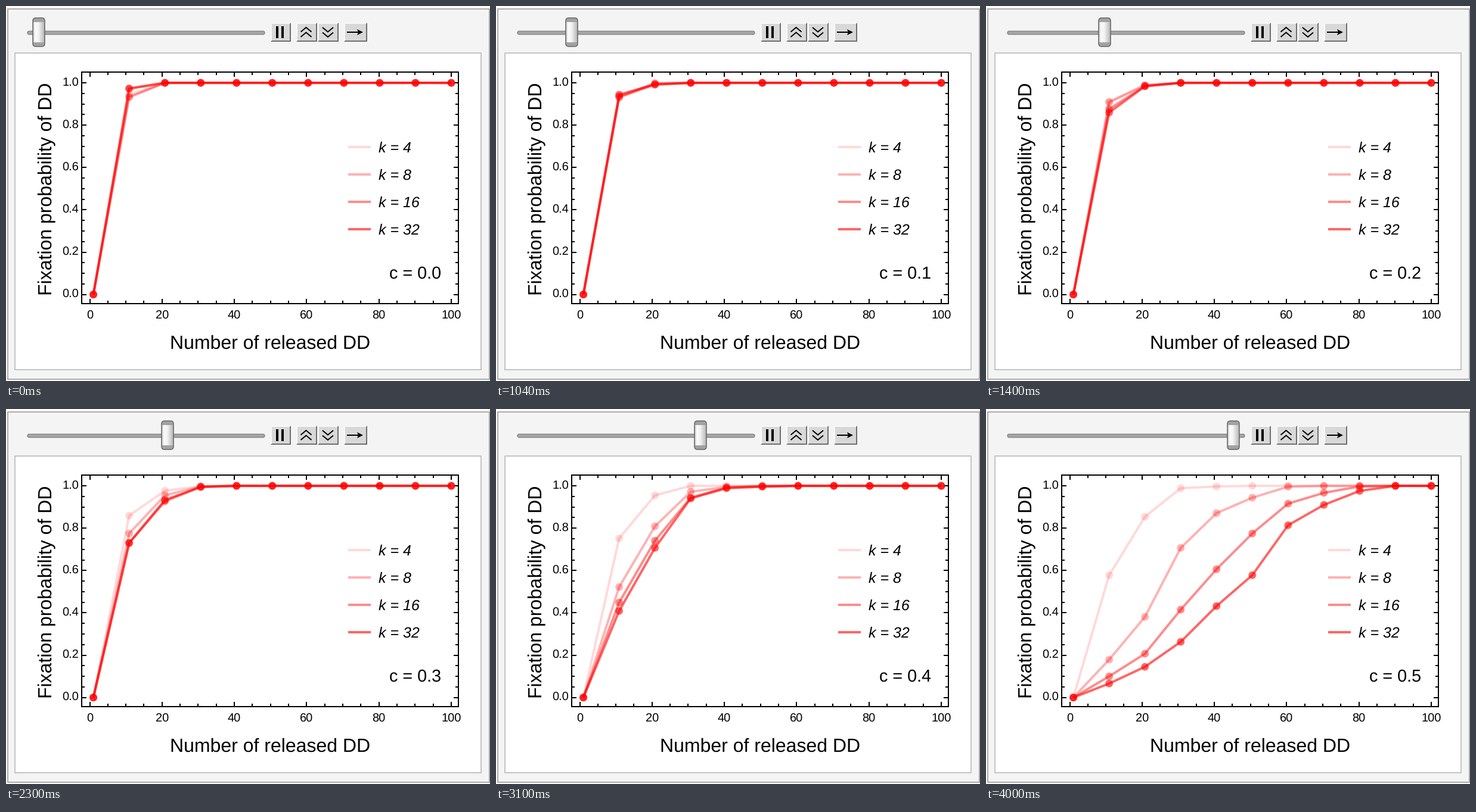
Animation of 812x630 px, one loop 4500 ms. Source, as a matplotlib script:

```python
import numpy as np
import matplotlib.pyplot as plt
from matplotlib.animation import FuncAnimation
from matplotlib.patches import Circle, FancyBboxPatch, Polygon, Rectangle

W, H, DPI = 812, 630, 64
PT = 72 / DPI  # points per pixel
RED = "#ff0000"
KS = (4, 8, 16, 32)
ALPHAS = (0.15, 0.30, 0.45, 0.60)
SWITCHES = (5, 14, 23, 31, 40)  # frames at which c grows by 0.1
RELEASED = np.arange(1, 102, 10) - np.arange(11) / 10

# Fixation probabilities for 11, 21, ... released; the rest are 1.
# One row per c, one curve per k.
CURVES = (
    ([.945], [.973], [.933], [.973]),
    ([.936, .999], [.930, .998], [.935, .991], [.944, .993]),
    ([.912, .990], [.908, .988], [.876, .985], [.860, .984]),
    ([.859, .977, .998], [.775, .955, .997],
     [.730, .927, .995], [.730, .933, .995]),
    ([.752, .955], [.522, .809, .972, .995],
     [.449, .741, .944, .992, .998], [.409, .707, .941, .989, .996]),
    ([.578, .854, .989, .997], [.179, .381, .707, .871, .944, .996],
     [.100, .207, .415, .606, .775, .916, .967, .997],
     [.066, .145, .263, .432, .578, .814, .910, .976]),
)

plt.rcParams.update({
    "font.family": "Liberation Sans",
    "text.hinting": "no_hinting",
    "toolbar": "None",
})
fig = plt.figure(figsize=(W / DPI, H / DPI), dpi=DPI, facecolor="white")
ax = fig.add_axes([0, 0, 1, 1])
ax.axis("off")


def px(v):
    return 140.5 + 6.065 * v


def py(p):
    return 484.7 - 355.6 * p


def line(xs, ys, width, color="black", **kw):
    kw.setdefault("solid_capstyle", "butt")
    return ax.plot(xs, ys, color=color, lw=width * PT, **kw)[0]


def text(x, y, s, size, **kw):
    return ax.text(x, y, s, fontsize=size * PT, va="baseline", **kw)


def box(x0, y0, x1, y1, face, edge="none", width=0, **kw):
    return ax.add_patch(Rectangle((x0, y0), x1 - x0, y1 - y0, fc=face,
                                  ec=edge, lw=width * PT, **kw))


def round_box(x0, y0, x1, y1, radius, face, edge, width, z):
    style = f"round,pad=0,rounding_size={radius}"
    return ax.add_patch(FancyBboxPatch(
        (x0, y0), x1 - x0, y1 - y0, boxstyle=style, fc=face, ec=edge,
        lw=width * PT, zorder=z))


def button(x0, x1):
    y0, y1 = 28, 60
    box(x0, y0, x1, y1, "#6f6f6f")
    ax.add_patch(Polygon([(x0, y0), (x1, y0), (x1 - 2, y0 + 2),
                          (x0 + 2, y1 - 2), (x0, y1)], fc="#f8f8f8", ec="none"))
    box(x0 + 2, y0 + 2, x1 - 2, y1 - 2, "#d8d8d8")


def chevrons(cx, tips, rise):
    for y in tips:
        line([cx - 9, cx, cx + 9], [y + rise, y, y + rise], 2,
             solid_joinstyle="miter")


def draw_panel():
    box(3, 5, 811, 627, "#f4f4f4", "#ababab", 2)
    box(15, 79, 797, 611, "white", "#c4c4c4", 2)
    round_box(36, 42.2, 434, 47.8, 2.7, "#a6a6a6", "#7c7c7c", 1.2, 2)
    for x0, x1 in ((444, 478), (487, 522), (523, 558), (567, 606)):
        button(x0, x1)
    for x in (453, 462):
        box(x, 34, x + 4, 54, "black")
    chevrons(503.5, (36, 44.5), 7.5)
    chevrons(540, (43.5, 52), -7.5)
    line([572, 592], [44, 44], 2)
    ax.add_patch(Polygon([(589, 39), (599, 44), (589, 49), (591, 44)],
                         fc="black", ec="none"))


def draw_axes():
    x0, x1, y0, y1 = 127, 759, 111, 500
    box(x0, y0, x1, y1, "none", "black", 2, zorder=2)
    for i in range(21):
        size = 5 if i % 4 else 8
        x, y = px(5 * i), py(i / 20)
        line([x, x], [y1, y1 - size], 2)
        line([x, x], [y0, y0 + size], 2)
        line([x0, x0 + size], [y, y], 2)
        line([x1, x1 - size], [y, y], 2)
        if i % 4 == 0:
            text(x, 526, str(5 * i), 20, ha="center")
            text(94, y + 5.2, f"{i / 20:.1f}", 20)
    text(275, 576, "Number of released DD", 32)
    text(76, 486.5, "Fixation probability of DD", 32, rotation=90,
         rotation_mode="anchor")


def draw_legend():
    for i, (k, alpha) in enumerate(zip(KS, ALPHAS)):
        y = 237 + 46 * i
        line([574, 612], [y, y], 4, RED, alpha=alpha)
        text(625, y + 8.5, f"k = {k}", 25, style="italic")


draw_panel()
draw_axes()
draw_legend()
c_label = text(643, 458, "", 28.7)

lines, dots = [], []
for alpha in ALPHAS:
    lines.append(line([], [], 4, RED, alpha=alpha, zorder=3,
                      solid_joinstyle="round"))
    group = [ax.add_patch(Circle((px(n), 0), 6.4, fc=RED, ec="none",
                                 alpha=alpha, zorder=4)) for n in RELEASED]
    dots.append(group)

# Slider thumb: grey rounded body with a shaded light face.
thumb = round_box(45, 20, 65, 68, 5, "#a2a2a2", "#6c6c6c", 1.6, 5)
shade = np.interp(np.arange(18), [0, 3, 8, 17], [0.86, 0.98, 0.95, 0.74])
face = ax.imshow(shade[None, :], cmap="gray", vmin=0, vmax=1, aspect="auto",
                 extent=(46, 64, 61, 27), zorder=6, interpolation="bilinear")
ax.set_xlim(0, W)
ax.set_ylim(H, 0)


def update(frame):
    step = int(np.searchsorted(SWITCHES, frame, side="right"))
    for curve, path, group in zip(CURVES[step], lines, dots):
        probs = np.ones(len(RELEASED))
        probs[0] = 0
        probs[1:len(curve) + 1] = curve
        path.set_data(px(RELEASED), py(probs))
        for dot, n, p in zip(group, RELEASED, probs):
            dot.center = px(n), py(p)
    x = 55 + 72 * step
    thumb.set_x(x - 10)
    face.set_extent((x - 9, x + 9, 61, 27))
    ax.set_xlim(0, W)
    ax.set_ylim(H, 0)
    c_label.set_text(f"c = {step / 10:.1f}")
    return [*lines, thumb, face, c_label]


anim = FuncAnimation(fig, update, frames=45, interval=100, repeat=True,
                     repeat_delay=0, blit=False)
plt.show()
```
